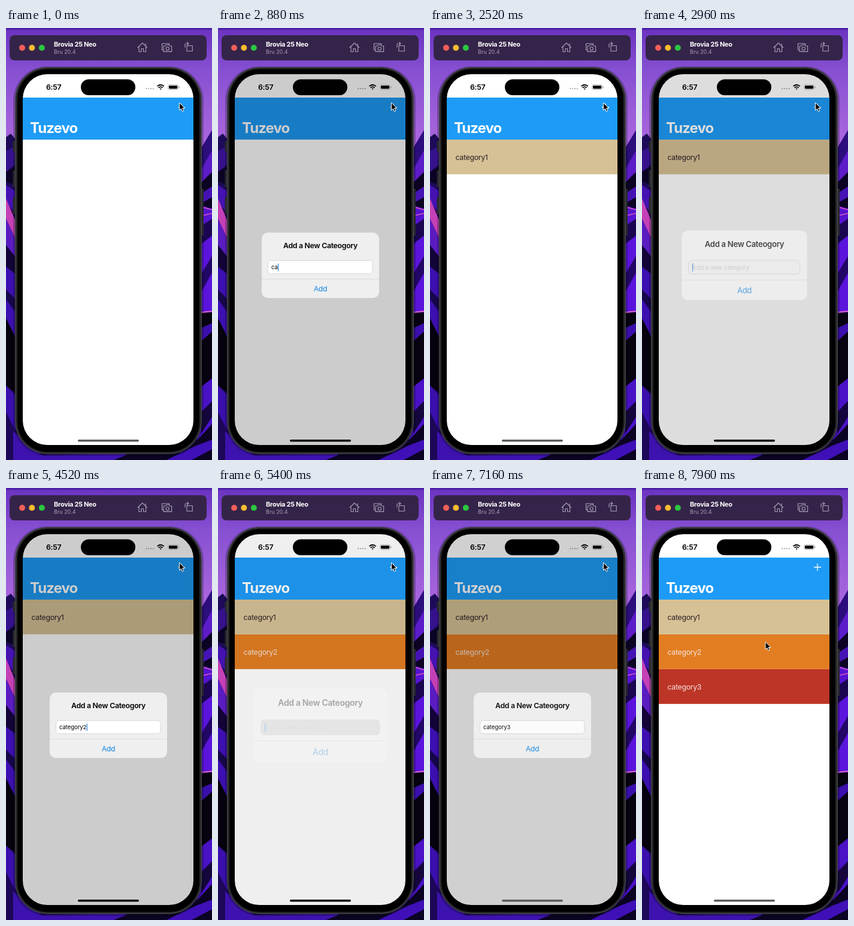
Write an HTML page that moves like this. It is 344 by 720 pixels and loops after 8000 ms.

```html
<!DOCTYPE html>
<html lang="en">
<head>
<meta charset="utf-8">
<title>Category list</title>
<style>
  html, body { margin: 0; width: 100%; height: 100%; overflow: hidden; background: #160634; }
  svg { display: block; width: 344px; height: 720px; }
  text { font-family: Inter, Roboto, sans-serif; font-size: 12.3px; letter-spacing: -.3px; }
  .semi { font-weight: 600; }
  .icon { fill: none; stroke: #aaa0b8; stroke-width: 1.1; stroke-linejoin: round; stroke-linecap: round; }
  .small { font-size: 9.6px; letter-spacing: -.1px; }
  .mid { text-anchor: middle; }
</style>
</head>
<body>
<svg viewBox="0 0 344 720">
  <defs>
    <linearGradient id="sky" x2="0" y2="1">
      <stop offset="0" stop-color="#6a32c0"/>
      <stop offset=".35" stop-color="#8650d2"/>
      <stop offset="1" stop-color="#ad68de"/>
    </linearGradient>
    <clipPath id="glass"><rect x="28" y="77" width="285" height="618" rx="41"/></clipPath>
  </defs>

  <!-- wallpaper -->
  <rect width="344" height="720" fill="#1a074e"/>
  <rect width="344" height="200" fill="url(#sky)"/>
  <rect width="344" height="3" fill="#4c1fa6"/>
  <path d="M0 182L8 176L18 188V300H0Z" fill="#1d0a58"/>
  <path d="M0 205L16 196V226L0 240Z" fill="#35128c"/>
  <path d="M0 240L16 230V262L0 256Z" fill="#0b0325"/>
  <path d="M0 262L16 272V310L0 290Z" fill="#4512b2"/>
  <path d="M0 284L16 322V352L0 318Z" fill="#c440b6"/>
  <path d="M0 318L16 352V382L0 362Z" fill="#5a1cc0"/>
  <path d="M0 362L16 382V410L0 398Z" fill="#120438"/>
  <path d="M0 398L16 410V516L0 484Z" fill="#3c0fb0"/>
  <path d="M0 436L16 452V474L0 452Z" fill="#16064a"/>
  <path d="M0 484L16 516V608L0 596Z" fill="#05010d"/>
  <path d="M0 596L16 612V720H0Z" fill="#3a0fac"/>
  <path d="M0 640L16 672V720H0Z" fill="#1c0758"/>
  <path d="M326 200L344 170V250H326Z" fill="#2c0e7c"/>
  <path d="M326 236L344 204V240L326 258Z" fill="#5c1cc8"/>
  <path d="M326 258L344 240V300H326Z" fill="#0c0324"/>
  <path d="M326 276L344 264V282L326 292Z" fill="#4513b4"/>
  <path d="M326 296L344 301V346L326 352Z" fill="#5514d0"/>
  <path d="M326 330L344 318V346L326 356Z" fill="#1a0650"/>
  <path d="M326 298L344 303M326 313L344 309" stroke="#db58c0" stroke-width="1.6"/>
  <path d="M326 360L344 346V474H326Z" fill="#5a14dc"/>
  <path d="M326 410L344 380V408L326 440Z" fill="#220766"/>
  <path d="M326 474L344 472" stroke="#e066c4" stroke-width="2"/>
  <path d="M326 476L344 474V584L326 598Z" fill="#070210"/>
  <path d="M326 500L344 492V506L326 522Z" fill="#3a0fae"/>
  <path d="M326 598L344 584V668L318 700Z" fill="#4912c6"/>
  <path d="M326 640L344 622V648L326 676Z" fill="#14053c"/>
  <path d="M12 672L60 712L200 709V720H12Z" fill="#3d12ae"/>
  <path d="M180 720L210 708H300L344 660V720Z" fill="#0b0322"/>
  <path d="M268 720L318 696L344 686V702L310 720Z" fill="#3f10b8"/>
  <rect x="12" y="64" width="318" height="649" rx="57" fill="#000" fill-opacity=".25"/>

  <!-- window bar -->
  <rect x="6" y="12" width="329" height="42" rx="8" fill="#352449"/>
  <circle cx="27" cy="33" r="5" fill="#f25f58"/>
  <circle cx="43.3" cy="33" r="5" fill="#f7bc30"/>
  <circle cx="59.8" cy="33" r="5" fill="#2cc641"/>
  <text x="80" y="31" fill="#fff" font-weight="700" style="font-size:11px">Brovia 25 Neo</text>
  <text x="80" y="43" fill="#a79db5" style="font-size:9px;letter-spacing:0">Bru 20.4</text>
  <g class="icon">
    <path d="M220 32.5L227.8 25L235.6 32.5M222 31V39.5H226V34.5H229.6V39.5H233.6V31M233 29V26"/>
    <path d="M262.5 36.5H260.5V26H272.5V28"/>
    <path d="M263 30H266L267.4 28H272.4L273.8 30H276.6V39.4H263Z"/>
    <circle cx="269.8" cy="34.4" r="2.6"/>
    <path d="M302 29.5H311.3V38.5H302ZM299 32V27.5Q299 26 301 26H305M302.7 23.7L305 26L302.7 28.3"/>
  </g>

  <!-- phone -->
  <g fill="#28282b">
    <rect x="11.5" y="189" width="5" height="17" rx="1"/>
    <rect x="11.5" y="237" width="5" height="28" rx="1"/>
    <rect x="11.5" y="282" width="5" height="28" rx="1"/>
    <rect x="325" y="268" width="5" height="78" rx="1"/>
  </g>
  <rect x="15.5" y="65.5" width="311" height="644" rx="54" fill="#29292b" stroke="#4c4c50"/>
  <rect x="19" y="68.5" width="304" height="638" rx="50" fill="#000"/>

  <g clip-path="url(#glass)">
    <rect x="28" y="77" width="285" height="618" fill="#fff"/>
    <rect x="28" y="116" width="285" height="70" fill="#1e9bf6"/>
    <text x="40" y="174.5" fill="#fff" font-weight="700" style="font-size:24px;letter-spacing:-.04em">Tuzevo</text>
    <path id="plus" d="M287 132H299M293 126V138" stroke="#fff" stroke-width="1.3"/>
    <g id="rows"></g>
    <g fill="#b5b5b8">
      <circle cx="234.3" cy="101" r="1.2"/><circle cx="238.2" cy="101" r="1.2"/>
      <circle cx="242.1" cy="101" r="1.2"/><circle cx="246" cy="101" r="1.2"/>
    </g>
    <rect id="dim" x="28" y="77" width="285" height="618"/>
    <text x="67" y="103" class="semi">6:57</text>
    <g fill="none" stroke="#000" stroke-width="1.8">
      <path d="M252.6 97.2Q258.2 92.2 263.8 97.2M254.7 99.7Q258.2 96.6 261.7 99.7"/>
      <path d="M256.6 101L258.2 103L259.8 101Q258.2 99.8 256.6 101Z" fill="#000" stroke="none"/>
      <rect x="270.6" y="94.6" width="17" height="8" rx="2.5" stroke="#999" stroke-width=".8"/>
      <rect x="272" y="96" width="14.2" height="5.2" rx="1.4" fill="#000" stroke="none"/>
      <path d="M289 97.2V100" stroke="#888" stroke-width="1"/>
    </g>
    <rect x="125" y="85.5" width="91" height="26.5" rx="13.2"/>
    <rect id="home" x="120" y="686" width="102" height="3.6" rx="1.8"/>
    <g id="alert">
      <rect id="panel" x="73" y="341" width="196" height="109" rx="10"/>
      <text x="171" y="367" class="semi mid">Add a New Cateogory</text>
      <rect id="field" x="83.5" y="387.5" width="174.5" height="22" rx="5" stroke="#d0d0d3" stroke-width=".8"/>
      <text id="hint" x="89" y="402.3" class="small" fill="#c3c3c6">Add a new category</text>
      <text id="typed" x="89" y="402.3" class="small"></text>
      <rect id="caret" y="392.5" width="1.2" height="12.5" fill="#2f7fd8"/>
      <path d="M73 418.5H269" stroke="#d6d6d8" stroke-width=".7"/>
      <text x="171" y="439" class="mid" fill="#1587e2">Add</text>
    </g>
  </g>

  <path id="pointer" d="M0 0V12.6L2.9 9.9L5 14.6L7.2 13.6L5.2 9.1H9.2Z" stroke="#fff" stroke-width="1"/>
</svg>
<script>
  const LOOP = 8000, SPRING = 0.0228, KEY_GAP = 110, ROW_DELAY = 400;
  const $ = id => document.getElementById(id);
  const set = (id, attrs) => {
    for (const key in attrs) $(id).setAttribute(key, attrs[key]);
  };
  const grey = level => {
    const v = Math.round(Math.min(255, level));
    return `rgb(${v},${v},${v})`;
  };
  const items = [
    { open: 240, close: 2054, fill: '#d6c196', ink: '#2c1e24' },
    { open: 2860, close: 4620, fill: '#e27d22', ink: '#f4e4dc' },
    { open: 5352, close: 7140, fill: '#bd3527', ink: '#f6e2df' },
  ].map((item, i) => ({ ...item, name: 'category' + (i + 1) }));

  $('rows').innerHTML = items.map(({ fill, ink, name }, i) => `
    <g><rect x="28" y="${186 + 58 * i}" width="285" height="58" fill="${fill}"/>
    <path d="M28 ${243.7 + 58 * i}H313" stroke="#fff" stroke-opacity=".3" stroke-width=".6"/>
    <text x="42.5" y="${219.5 + 58 * i}" fill="${ink}">${name}</text></g>`).join('');
  const rows = [...$('rows').children];

  // critically damped spring from 0 to 1
  const spring = ms => ms <= 0 ? 0 : 1 - (1 + SPRING * ms) * Math.exp(-SPRING * ms);
  const smooth = x => { x = Math.min(1, Math.max(0, x)); return x * x * (3 - 2 * x); };

  function typedLength(ms) {
    if (ms < 500) return 0;
    return Math.min(8, 1 + Math.floor((ms - 500) / KEY_GAP)) + (ms > 1450 ? 1 : 0);
  }

  function draw(t) {
    const item = items.findLast(({ open }) => t >= open) || items[0];
    const closing = t >= item.close;
    const shown = closing ? 1 - spring(t - item.close) : spring(t - item.open);
    const scale = closing ? 1 : 1.2 - 0.2 * shown;
    const pressed = items.some(({ open }) => t >= open - 250 && t < open);

    set('dim', { opacity: 0.2 * shown });
    set('alert', {
      opacity: shown,
      transform: `translate(171 395.5) scale(${scale}) translate(-171 -395.5)`,
    });
    set('panel', { fill: grey(257 - 18 * shown) });
    set('field', { fill: grey(180 + 92 * shown) });

    const text = item.name.slice(0, typedLength(t - item.open));
    $('typed').textContent = text;
    set('hint', { opacity: text ? 0 : 1 });
    set('caret', {
      x: 89.3 + (text ? $('typed').getComputedTextLength() : 0),
      opacity: closing ? 0 : 1,
    });

    items.forEach(({ close }, i) => {
      rows[i].style.display = t >= close + ROW_DELAY ? '' : 'none';
    });
    set('plus', {
      opacity: pressed ? 0.35 : 1,
      stroke: t >= item.open && shown > 0.5 ? '#c4c4c4' : '#fff',
    });
    set('home', { fill: t >= item.open && !closing ? '#000' : '#5c5c5e' });

    const move = smooth((t - 7560) / 340);
    set('pointer', { transform: `translate(${289.5 - 83.5 * move} ${124.5 + 132 * move})` });
  }

  function tick() {
    draw(performance.now() % LOOP);
    requestAnimationFrame(tick);
  }
  tick();
</script>
</body>
</html>
```
